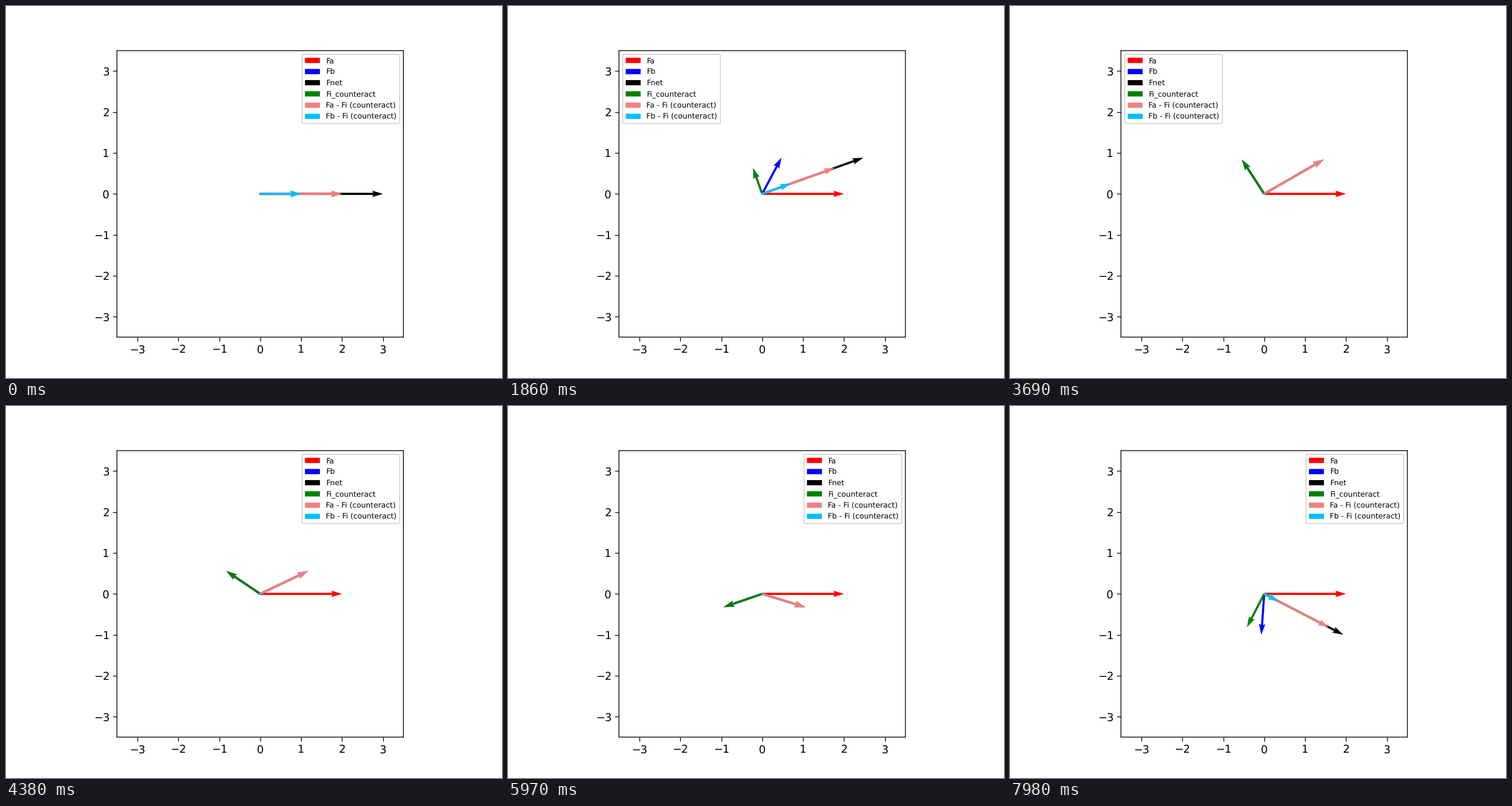
A matplotlib script that plays this animation: 864x648 px, repeating every 8000 ms.

```python
import numpy as np
import matplotlib.pyplot as plt
from matplotlib.animation import FuncAnimation

LOOP_MS = 8000
FRAMES = 267  # one degree of rotation per frame

FORCES = [
    ("Fa", "red"),
    ("Fb", "blue"),
    ("Fnet", "black"),
    ("Fi_counteract", "green"),
    ("Fa - Fi (counteract)", "lightcoral"),
    ("Fb - Fi (counteract)", "deepskyblue"),
]

# Smooth, unsnapped lines and text.
plt.rcParams.update({
    "path.snap": False,
    "text.hinting": "none",
    "axes.linewidth": 0.72,
    "xtick.major.width": 0.72,
    "ytick.major.width": 0.72,
})


def vectors(deg):
    """Force vectors, in drawing order, with Fb turned by deg."""
    t = np.radians(deg)
    fa = np.array([2.0, 0.0])
    fb = np.array([np.cos(t), np.sin(t)])
    net = fa + fb
    # Only a forward part of Fb along the net force survives.
    along = max(0.0, fb @ net / (net @ net))
    fb_rest = along * net
    fi = fb - fb_rest
    return fa, fb, net, fi, fa + fi, fb_rest


fig, ax = plt.subplots(figsize=(6.4, 4.8), dpi=135)
ax.set(xlim=(-3.5, 3.5), ylim=(-3.5, 3.5), aspect="equal")
ax.set_xticks(range(-3, 4))
ax.set_yticks(range(-3, 4))

arrows = [
    ax.quiver([0], [0], [v[0]], [v[1]], color=color, label=label,
              angles="xy", scale_units="xy", scale=1)
    for (label, color), v in zip(FORCES, vectors(0))
]
legend = ax.legend(loc="upper right", fontsize="x-small", labelspacing=0.525)


def update(deg):
    for arrow, (u, v) in zip(arrows, vectors(deg)):
        arrow.set_UVC([u], [v])
    legend.set_loc("upper left" if 45 <= deg <= 135 else "upper right")
    return [*arrows, legend]


anim = FuncAnimation(fig, update, frames=FRAMES, interval=LOOP_MS / FRAMES,
                     init_func=lambda: update(0), repeat=True, repeat_delay=0)

plt.show()
```
